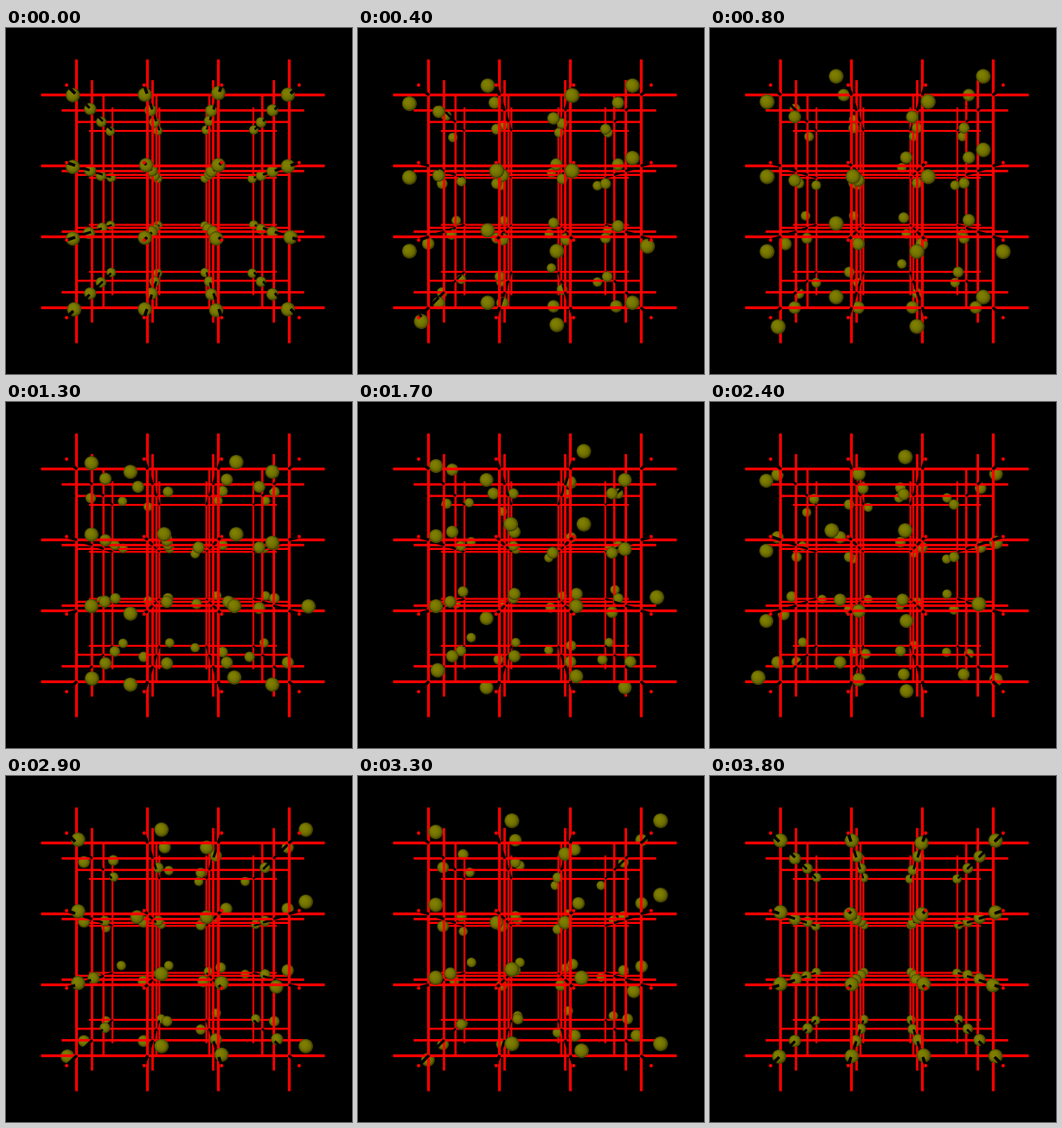
A matplotlib script that plays this animation: 400x400 px, repeating every 3.9 s.

```python
import numpy as np
import matplotlib.pyplot as plt
from matplotlib.animation import FuncAnimation
from matplotlib.collections import LineCollection
from matplotlib.patches import Circle

SIZE, DPI = 400, 100
FRAMES, STEP_MS = 39, 100
CX, CY = 204.5, 200.4
UNIT, FALLOFF = 82, 0.17        # front lattice spacing in px, shrink per layer
ROD, BALL = 0.04, 0.1           # rod width and ball radius, in spacings
GRID = np.arange(4) - 1.5
RED = "#ff0000"

# One string per layer, front to back; each letter picks a ball's orbit.
LAYERS = ["abcb accb abac cbab",
          "cbab ccbb accb ccaa",
          "baca aaca caba abcb",
          "abcc cabа bbac caba".replace("а", "a")]

# Every orbit leaves rest, passes a few points (right, up, towards the
# viewer; hundredths of a spacing) and comes back to rest.
REST = (-1, 0, 6)
TIMES = [-0.5, 8, 13, 17, 24, 33]
ORBITS = {
    "a": [(-10, -17, 31), (22, 7, 4), (9, 6, -7), (-22, -15, -7), (14, 11, 16)],
    "b": [(-19, 20, 21), (-24, -4, 0), (-20, -12, -15), (9, -2, -20), (19, 23, 27)],
    "c": [(5, -17, 32), (24, 7, 10), (17, 20, 17), (-25, 11, 21), (-6, -11, -20)],
}


def harmonics(t):
    """Slow periodic terms, the faster ones weighted down."""
    w = 2 * np.pi * np.asarray(t, float) / FRAMES
    cols = [np.ones_like(w)]
    for k in range(1, 4):
        cols += [np.cos(k * w) / k, np.sin(k * w) / k]
    return np.stack(cols, axis=-1)


def closed_curve(points):
    """Smooth loop from rest through the points, one position per frame."""
    targets = np.array([REST] + points) / 100
    weights = np.linalg.pinv(harmonics(TIMES)) @ targets
    return harmonics(np.arange(FRAMES)) @ weights


def scale(depth):
    return UNIT / (1 + FALLOFF * depth)


def project(x, y, depth):
    s = scale(depth)
    return CX + x * s, CY - y * s


def order(depth):
    return 10 - depth


fig = plt.figure(figsize=(SIZE / DPI, SIZE / DPI), dpi=DPI, facecolor="black")
ax = fig.add_axes([0, 0, 1, 1])
ax.set_xlim(0, SIZE)
ax.set_ylim(SIZE, 0)
ax.axis("off")


def add_rods(segments, depth, color):
    rods = LineCollection(segments, colors=color, capstyle="butt",
                          linewidths=ROD * scale(depth) * 72 / DPI,
                          zorder=order(depth))
    rods.set_snap(False)
    ax.add_collection(rods, autolim=False)


# Rods across each layer
for layer in range(4):
    across = [[project(-2, g, layer), project(2, g, layer)] for g in GRID]
    upright = [[project(g, -2, layer), project(g, 2, layer)] for g in GRID]
    add_rods(across + upright, layer, RED)

# Rods along the view: unlit sides in short pieces, lit front ends
PIECE = 0.1
nodes = [(x, y) for x in GRID for y in GRID]
for d in np.arange(-0.5, 3.45, PIECE):
    add_rods([[project(x, y, d), project(x, y, d + PIECE + 0.03)]
              for x, y in nodes], d + PIECE / 2, "black")
for x, y in nodes:
    ax.add_patch(Circle(project(x, y, -0.5), 0.55 * ROD * scale(-0.5),
                        color=RED, lw=0, zorder=order(-0.52)))


class Ball:
    """Stacked discs that brighten towards the upper left."""
    PARTS = np.linspace(1, 0.4, 5)

    def __init__(self, x, y, layer, orbit):
        self.home = np.array([x, y, layer])
        self.orbit = orbit
        glow = 0.28 + 0.23 * np.sqrt(1 - self.PARTS**2)
        self.discs = [ax.add_patch(Circle((0, 0), 1, fc=(g, g, 0), lw=0))
                      for g in glow]

    def move(self, frame):
        right, up, near = self.orbit[frame]
        x, y, depth = self.home + (right, up, -near)
        px, py = project(x, y, depth)
        r = BALL * scale(depth)
        for disc, part in zip(self.discs, self.PARTS):
            shift = (1 - part) * r * 0.4
            disc.center = px - shift, py - shift
            disc.radius = r * part
            disc.set_zorder(order(depth - 0.07))


orbits = {name: closed_curve(points) for name, points in ORBITS.items()}
balls = [Ball(GRID[col], -GRID[row], layer, orbits[name])
         for layer, rows in enumerate(LAYERS)
         for row, names in enumerate(rows.split())
         for col, name in enumerate(names)]


def update(frame):
    for ball in balls:
        ball.move(frame)
    return []


anim = FuncAnimation(fig, update, frames=FRAMES, interval=STEP_MS,
                     repeat=True, repeat_delay=0, blit=False)
plt.show()
```
